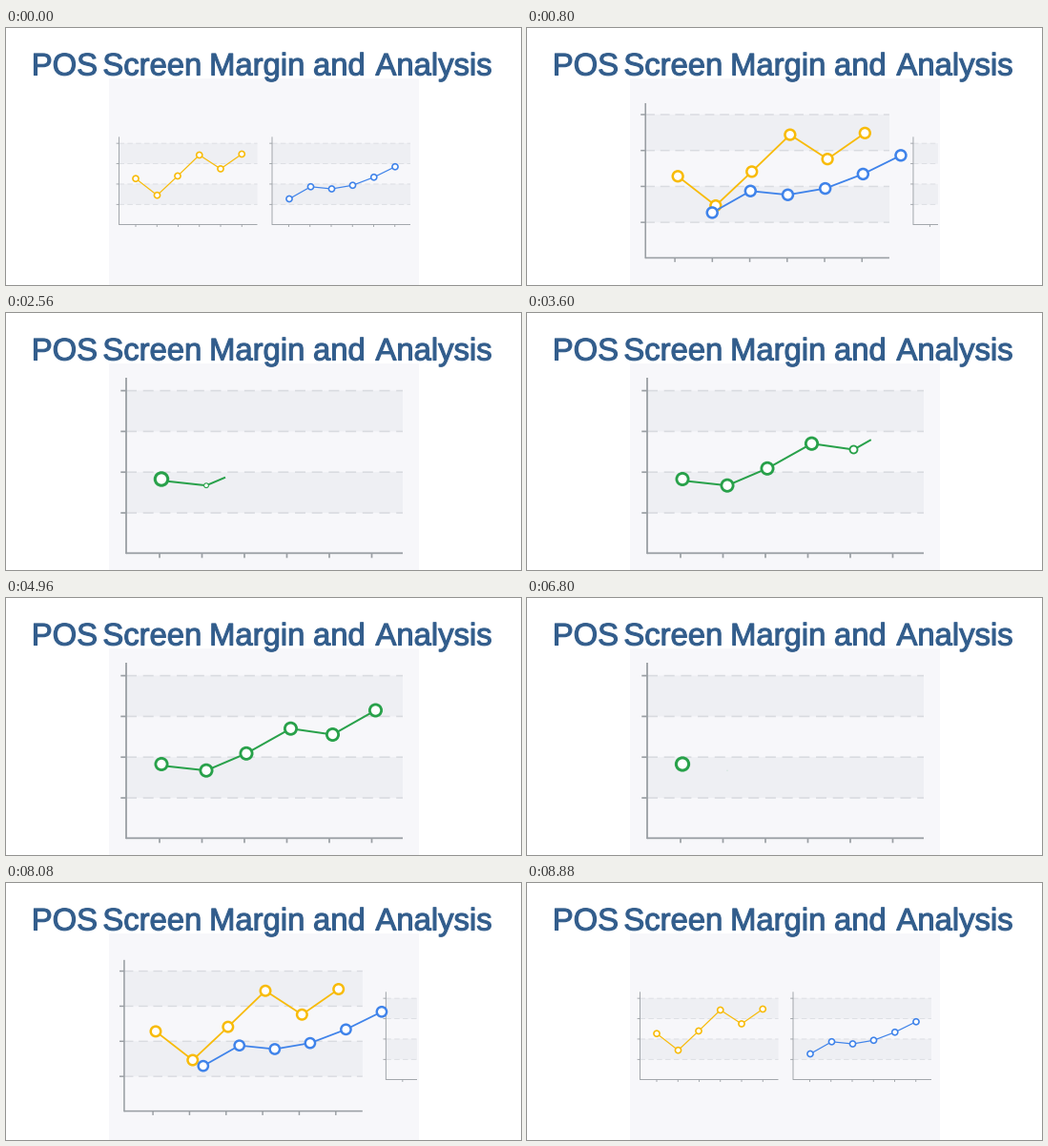
Recreate the animation shown at these times as a matplotlib script. Size 540 by 270 pixels, loop 8960 ms.

```python
import numpy as np
import matplotlib.pyplot as plt
from matplotlib.animation import FuncAnimation
from matplotlib.patches import Circle, PathPatch, Rectangle
from matplotlib.textpath import TextPath
from matplotlib.transforms import Affine2D

W, H, DPI = 540, 270, 100
STEP, FRAMES = 80, 112
PX = 72 / DPI  # points per pixel

YELLOW, BLUE, GREEN = "#f8bb08", "#3f83ea", "#28a14a"
AXIS, DASH, BAND, PANEL, TITLE = "#9a9fa4", "#d9dbe0", "#eeeff3", "#f7f7fa", "#325d8c"

yellow = np.array([(165, 155), (210, 190), (253, 149.5),
                   (298.5, 105.5), (343, 134.5), (387.5, 103.5)])
blue = np.array([(165.5, 198), (210.5, 172.5), (254.5, 177),
                 (298.5, 169.5), (343, 152.5), (387.5, 130.5)])
green = np.array([(163, 174.5), (210, 181.2), (252, 163.3),
                  (298.5, 137.2), (342.5, 143.5), (387.5, 118)])
# Half-size versions, each anchored on its first point
yellow_small = (136, 158.2) + (yellow - yellow[0]) / 2
blue_small = (297, 179.5) + (blue - blue[0]) / 2

BIG, LEFT, RIGHT = np.array([126, 252.3]), np.array([118.5, 206.5]), np.array([279, 206.5])

fig = plt.figure(figsize=(W / DPI, H / DPI), dpi=DPI, facecolor="white")
ax = fig.add_axes([0, 0, 1, 1])
ax.set_xlim(0, W)
ax.set_ylim(H, 0)
ax.axis("off")

ax.add_patch(Rectangle((107.5, 53), 325.5, 217, fc=PANEL, lw=0, zorder=0))


def title_word(word, center):
    text = TextPath((0, 0), word, size=32.8, prop={"family": "Liberation Sans"})
    box = text.get_extents()
    place = Affine2D().scale(1, -1).translate(center - (box.x0 + box.x1) / 2, 49.5)
    ax.add_patch(PathPatch(text.transformed(place), fc=TITLE, ec=TITLE,
                           lw=1.1 * PX, joinstyle="round", zorder=20))


for word, center in (("POS", 62), ("Screen", 153), ("Margin", 263.5),
                     ("and", 349), ("Analysis", 448)):
    title_word(word, center)

clip = Rectangle((107.5, 53), 323, 217, transform=ax.transData)
live = []


def keep(artist):
    artist.set_clip_path(clip)
    artist.set_snap(False)
    live.append(artist)


def line(xs, ys, color, width, z, **style):
    keep(ax.plot(xs, ys, color=color, lw=width * PX, zorder=z,
                 solid_capstyle="butt", dash_capstyle="butt", **style)[0])


def lerp(a, b, s):
    return a + (b - a) * s


def ease(p, a=0.53):
    """Height of the cubic bezier (a, 0, 0, 1) at p."""
    u = np.linspace(0, 1, 400)
    return float(np.interp(p, 3 * a * u * (1 - u) ** 2 + u ** 3, 3 * u ** 2 - 2 * u ** 3))


def merge(t, lead=1.0):
    """0 = two small charts, 1 = one large chart."""
    if t < 4500:
        return ease((t - 500) / 700 * lead)
    return 1 - ease((t - 7840) / 867 * lead)


def pop(p):
    p = np.clip(p, 0, 1) ** 1.5 - 1
    return max(0.0, 1 + 2.7 * p ** 3 + 1.7 * p ** 2)


def reach(pts):
    x = pts[:, 0]
    return (x - x[0]) / (x[-1] - x[0])


def appear(t, pts, start, span, grow):
    p = np.clip((t - start) / span, 0, 1)
    hits = start + span * (1 - (1 - reach(pts)) ** (2 / 3))
    return 1 - (1 - p) ** 1.5, [pop((t - h) / grow) for h in hits]


def vanish(t, pts, start, span, shrink):
    p = np.clip((t - start) / span, 0, 1)
    hits = start + span * (1 - reach(pts)) ** (2 / 3)
    return 1 - p ** 1.5, [pop(1 - (t - h) / shrink) for h in hits]


def draw_axes(origin, k, z):
    def at(x, y):
        return origin + k * (np.array([x, y]) - BIG)

    def seg(x0, y0, x1, y1, color, width, **style):
        a, b = at(x0, y0), at(x1, y1)
        line([a[0], b[0]], [a[1], b[1]], color, width * k, z + 1, **style)

    rows = [81.6, 124.4, 167.2, 210]
    for top in rows[::2]:
        keep(ax.add_patch(Rectangle(at(126, top), 290 * k, 42.8 * k,
                                    fc=BAND, lw=0, zorder=z)))
    for y in rows:
        seg(126, y, 416, y, DASH, 1.6, dashes=(11 / 1.6, 6.7 / 1.6))
        seg(120.3, y, 126, y, AXIS, 1.7)
    for i in range(6):
        x = 161 + 44.5 * i
        seg(x, 252.3, x, 257.3, AXIS, 1.7)
    seg(126, 68, 126, 253.1, AXIS, 1.8)
    seg(126, 252.3, 416, 252.3, AXIS, 1.8)


def draw_series(pts, color, k, state, z, dip=0):
    shown, sizes = state
    if shown > 0.001:
        x, y = pts[:, 0], pts[:, 1].copy()
        y[0] += dip
        tip = lerp(x[0], x[-1], shown)
        xs = np.append(x[x < tip], tip)
        line(xs, np.interp(xs, x, y), color, 0.4 + 1.6 * k, z, solid_joinstyle="round")
    for point, size in zip(pts, sizes):
        if size > 0.01:
            keep(ax.add_patch(Circle(point, 6.1 * k * size, fc="white", ec=color,
                                     lw=(0.4 + 2.4 * k) * size * PX, zorder=z + 1)))


def draw(n):
    while live:
        live.pop().remove()
    t = n * STEP
    s, sb = merge(t), merge(t, 1.03)
    draw_axes(lerp(LEFT, BIG, s), lerp(0.5, 1, s), 1)
    if s < 0.99:
        draw_axes(RIGHT + (165 * s, 0), 0.5, 1)

    for small, big, color, m, z in ((yellow_small, yellow, YELLOW, s, 4),
                                    (blue_small, blue, BLUE, sb, 6)):
        if t < 4500:
            state = vanish(t, big, 1190, 620, 350)
        else:
            state = appear(t, big, 6880, 300, 600)
        draw_series(lerp(small, big, m), color, lerp(0.5, 1, m), state, z)

    if t < 5000:
        state = appear(t, green, 2160, 1900, 600)
    else:
        state = vanish(t, green, 5280, 1387, 350)
    draw_series(green, GREEN, 1, state, 8, dip=1.6)
    return live


anim = FuncAnimation(fig, draw, frames=FRAMES, interval=STEP, repeat=True,
                     repeat_delay=0, blit=False)
plt.show()
```
